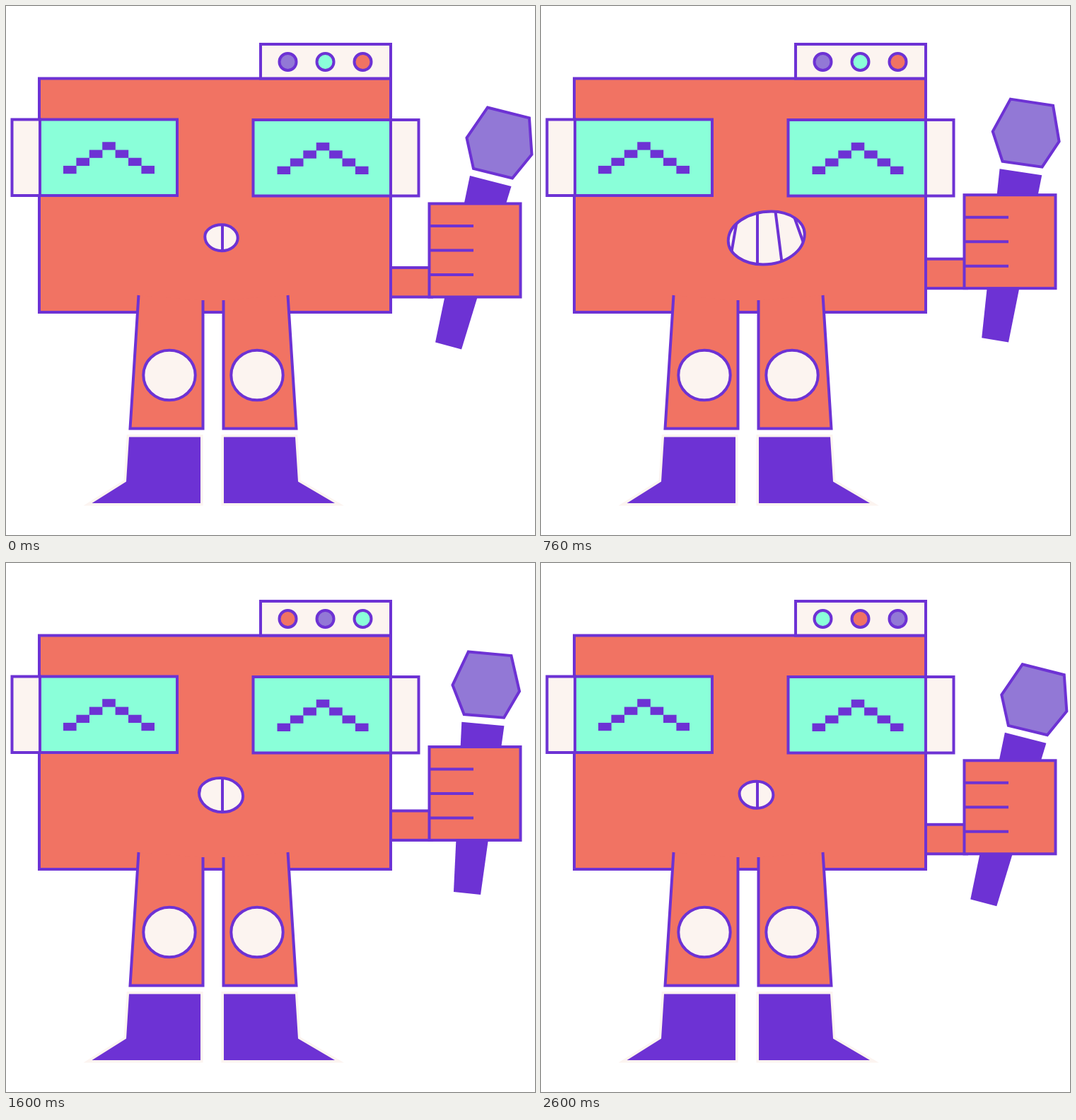
An HTML page for the animation above (2.64 s loop, 748 px wide and 748 px high).

```html
<!DOCTYPE html>
<html lang="en">
<head>
<meta charset="utf-8">
<title>Singing robot</title>
<style>
  html, body { margin: 0; width: 100%; height: 100%; overflow: hidden; background: #fff; }
  svg { display: block; width: 100vw; height: 100vh; }
  .ink { stroke: #6d32d4; stroke-width: 4; }
  .coral { fill: #f17363; }
  .cream { fill: #fcf4f0; }
  .mint { fill: #8affd9; }
  .lilac { fill: #9278d6; }
  .solid { fill: #6d32d4; }
  .line { fill: none; }
  .shoe { fill: #6d32d4; stroke: #fcf4f0; stroke-width: 7; stroke-miterlimit: 10; paint-order: stroke; }
</style>
</head>
<body>
<svg viewBox="0 0 748 748">
  <defs>
    <clipPath id="mouthClip"><path id="clipShape"/></clipPath>
    <g id="brow" class="solid"></g>
  </defs>

  <g id="arm">
    <g id="mic">
      <path class="solid" d="M656 240 714.5 255 644 485.5 607 475.5Z"/>
      <path class="lilac ink" d="M681 143.5 740 158.5 743.5 210 716 243.5 661 230 651.5 186.5Z"/>
    </g>
    <rect class="coral ink" x="540" y="370" width="62" height="41.5"/>
    <rect class="coral ink" x="598.5" y="279.5" width="129" height="132"/>
    <path class="line ink" d="M598.5 311H661M598.5 345.5H661M598.5 380H661"/>
  </g>

  <rect class="coral ink" x="47" y="102.5" width="497" height="330.5"/>
  <rect class="cream ink" x="360" y="54" width="184" height="48.5"/>
  <g id="lights" class="ink">
    <circle cx="398.5" cy="79" r="12"/>
    <circle cx="451.5" cy="79" r="12"/>
    <circle cx="504.5" cy="79" r="12"/>
  </g>

  <g class="ink">
    <rect class="cream" x="8.5" y="160.5" width="39.5" height="107.5"/>
    <rect class="mint" x="48" y="160.5" width="194" height="107.5"/>
    <rect class="cream" x="544" y="161" width="39.5" height="107.5"/>
    <rect class="mint" x="349.5" y="161" width="194.5" height="107.5"/>
  </g>
  <use href="#brow"/>
  <use href="#brow" x="302.5" y="0.8"/>

  <path id="mouthFill" class="cream"/>
  <path class="line ink" clip-path="url(#mouthClip)"
    d="M279.5 289 268 356M306 280V375M331 287 341 366M355.5 291 374 343"/>
  <path id="mouthEdge" class="line ink"/>

  <g class="coral ink">
    <path d="M187.5 409 175.5 597.5H278.5V416"/>
    <path d="M307.5 416V597.5H410.5L398.5 409"/>
  </g>
  <g class="cream ink">
    <ellipse cx="231" cy="522" rx="36.7" ry="35.3"/>
    <ellipse cx="355" cy="522" rx="36.7" ry="35.3"/>
  </g>
  <path class="shoe" d="M174 609.5H275V703H121.5L170 672.5Z"/>
  <path class="shoe" d="M308 609.5H409L413 672.5 465 703H308Z"/>
</svg>

<script>
const LOOP = 2640, HALF = LOOP / 2, LAG = 36;
const $ = id => document.getElementById(id);
const smooth = s => s * s * (3 - 2 * s);
// Eased 0 -> 1 -> 0 over one period
const swing = (t, period) => smooth(1 - Math.abs(1 - 2 * (t % period) / period));

for (let i = 0; i < 7; i++) {
  const y = 192.3 + 11.2 * Math.abs(i - 3);
  $('brow').insertAdjacentHTML('beforeend',
    `<rect x="${81 + 18.4 * i}" y="${y}" width="18.6" height="11.3"/>`);
}

// Mouth extremes: left, top, right, bottom as x, y
const small = [281.5, 326, 305, 309.5, 327.5, 328, 305, 346];
const wideRight = [264.3, 332.5, 326.5, 290, 374, 322, 314, 366];
const wideLeft = [254, 321.5, 299, 292, 352, 333.5, 308.5, 366];

function oval([lx, ly, tx, ty, rx, ry, bx, by]) {
  const k = (a, b) => a + (b - a) * 0.5523;
  return `M${lx} ${ly}C${lx} ${k(ly, ty)} ${k(tx, lx)} ${ty} ${tx} ${ty}` +
    `C${k(tx, rx)} ${ty} ${rx} ${k(ry, ty)} ${rx} ${ry}` +
    `C${rx} ${k(ry, by)} ${k(bx, rx)} ${by} ${bx} ${by}` +
    `C${k(bx, lx)} ${by} ${lx} ${k(ly, by)} ${lx} ${ly}Z`;
}

const colours = ['lilac', 'mint', 'coral'];
const lights = [...$('lights').children];

function draw(now) {
  const time = now % LOOP;
  const t = (time - LAG + LOOP) % LOOP;

  const lift = swing(t, LOOP);
  $('arm').setAttribute('transform', `translate(0 ${-21.5 * lift})`);
  $('mic').setAttribute('transform', `rotate(${-9.95 * lift} 677 316)`);

  const open = swing(t, HALF);
  const wide = t < HALF ? wideRight : wideLeft;
  const d = oval(small.map((v, i) => v + (wide[i] - v) * open));
  for (const id of ['mouthFill', 'mouthEdge', 'clipShape']) $(id).setAttribute('d', d);

  const step = Math.floor(time / (LOOP / 3));
  lights.forEach((light, i) => light.setAttribute('class', colours[(i - step + 3) % 3]));
}

const start = performance.now();
function tick() {
  draw(performance.now() - start);
  requestAnimationFrame(tick);
}
draw(0);
requestAnimationFrame(tick);
</script>
</body>
</html>
```
